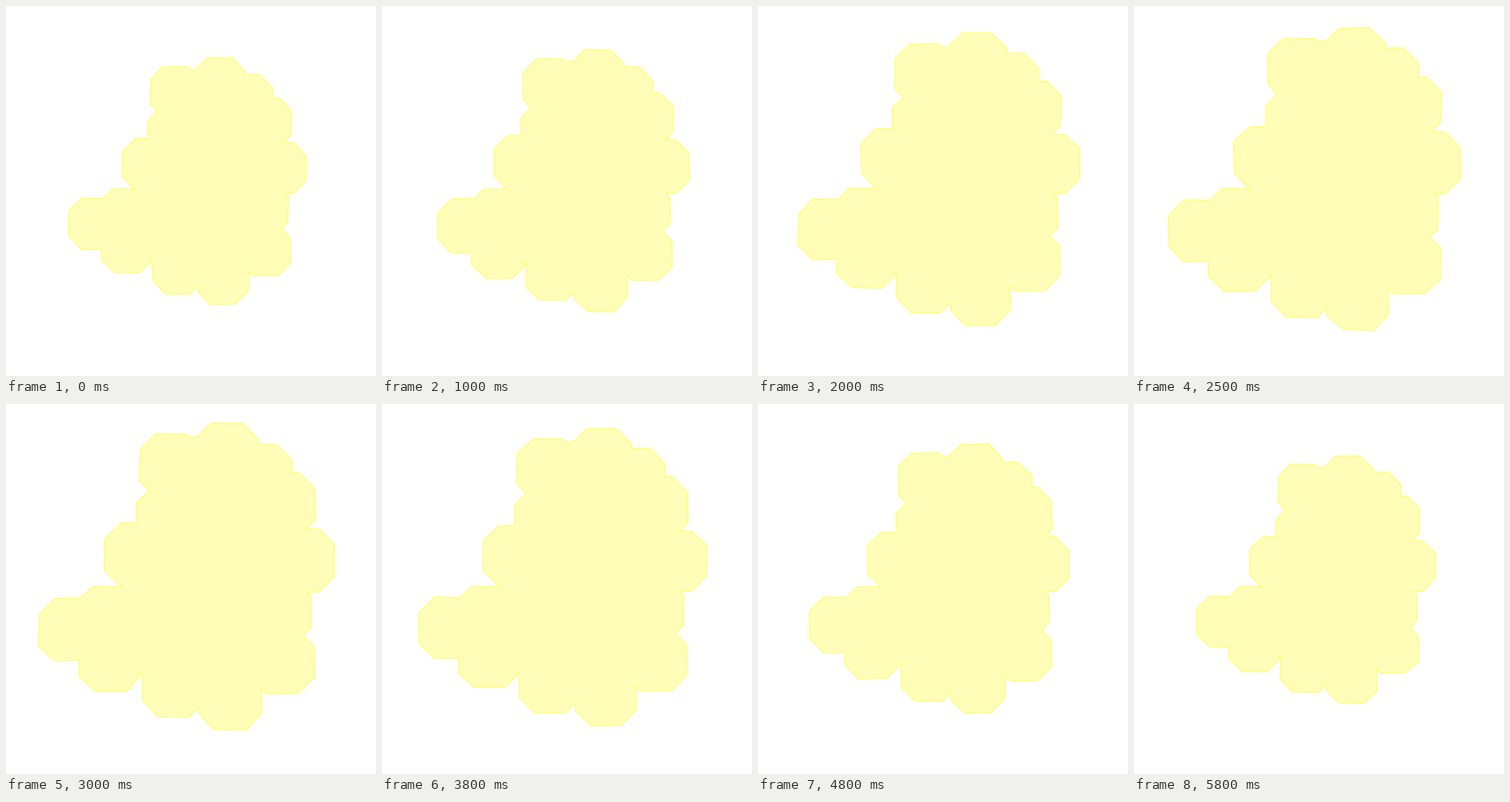
Write an HTML page that moves like this. It is 520 px wide and 520 px high and loops after 6000 ms.

```html
<!DOCTYPE html>
<html lang="en">
<head>
<meta charset="utf-8">
<title>Breathing cluster</title>
<style>
  html, body { margin: 0; width: 100%; height: 100%; overflow: hidden; background: #fff; }
  svg { display: block; width: 100%; height: 100%; }
</style>
</head>
<body>
<svg viewBox="0 0 520 520">
  <path id="edge" fill="none" stroke="#ffff4d" stroke-width="2" stroke-linejoin="round"/>
  <path id="body" fill="#fffdb8"/>
</svg>
<script>
const LOOP = 6000, STEPS = 24, GROWTH = 0.245, RADIUS = 35, WOBBLE = 1;
const CENTER = { x: 263, y: 262 };

// Cell centres at the smallest size, clockwise around the rim; the arm sticks out of it.
const rim = [
  [199, 222], [235, 180], [238, 121], [250, 125], [301, 109], [339, 132], [365, 165],
  [387, 228], [361, 286], [364, 343], [305, 384], [241, 369], [170, 340], [167, 293]
];
const arm = [124, 306];

const edge = document.getElementById('edge');
const body = document.getElementById('body');

function noise(a, b) {
  const v = Math.sin(a * 12.9898 + b * 78.233) * 43758.5453;
  return (v - Math.floor(v)) * 2 - 1;
}

const clamp = v => Math.max(-1, Math.min(1, v));

function polygon(points) {
  return 'M' + points.map(p => p[0].toFixed(1) + ' ' + p[1].toFixed(1)).join('L') + 'Z';
}

// An octagon with cut corners, each vertex slightly unsteady.
function octagon([x, y], r, seed, step) {
  return polygon(Array.from({ length: 8 }, (_, i) => {
    const angle = (i + 0.5) * Math.PI / 4;
    const id = seed * 16 + i * 2 + 1;
    return [
      x + r * clamp(1.3 * Math.cos(angle)) + WOBBLE * noise(id, step),
      y + r * clamp(1.3 * Math.sin(angle)) + WOBBLE * noise(id + 1, step)
    ];
  }));
}

function outline(step) {
  const scale = 1 + GROWTH * (1 - Math.cos(2 * Math.PI * step / STEPS)) / 2;
  const place = ([x, y]) => [
    CENTER.x + (x - CENTER.x) * scale,
    CENTER.y + (y - CENTER.y) * scale
  ];
  const cells = [...rim, arm].map((c, i) => octagon(place(c), RADIUS * scale, i, step));
  return cells.join('') + polygon(rim.map(place));
}

// Steps last 250 ms, with their starts rounded up to the next 100 ms.
function stepAt(ms) {
  return Math.floor(Math.floor(ms / 100) * 100 / (LOOP / STEPS));
}

let shown = -1;
function draw(ms) {
  const step = stepAt(ms % LOOP);
  if (step === shown) return;
  shown = step;
  const d = outline(step);
  edge.setAttribute('d', d);
  body.setAttribute('d', d);
}

const start = performance.now();
function tick() {
  draw(performance.now() - start);
  requestAnimationFrame(tick);
}
tick();
</script>
</body>
</html>
```
